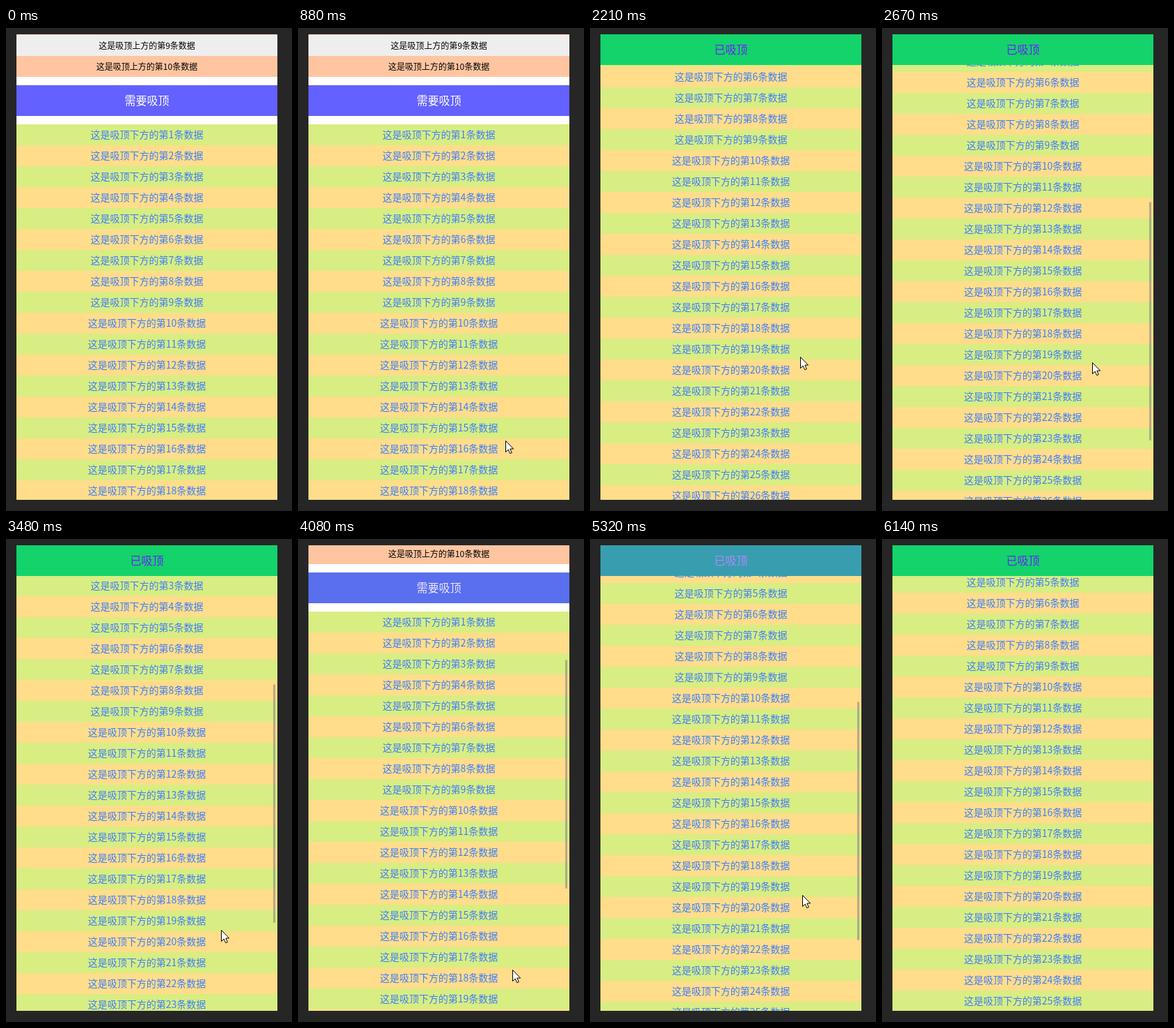
Recreate the animation shown at these times as an HTML page with a canvas. Size 411 px wide and 692 px high, loop 6460 ms.

```html
<!DOCTYPE html>
<html lang="zh-CN">
<head>
<meta charset="utf-8">
<title>吸顶</title>
<style>
html, body { margin: 0; width: 100%; height: 100%; overflow: hidden; background: #262626; }
canvas { display: block; }
</style>
</head>
<body>
<canvas id="stage" width="411" height="692"></canvas>
<script>
const ctx = document.getElementById('stage').getContext('2d');
const LOOP = 6460, LEFT = 15, TOP = 9, WIDTH = 375, HEIGHT = 667, ROW = 30, BAR = 44, GAP = 12;
const ABOVE = 360;            // height of everything before the bar
const STICK = ABOVE + GAP;    // offset at which the bar reaches the top
const FADE = 500;             // colour transition of the bar

// [time, scroll offset]
const SCROLL = [[1050, 299], [1410, 376], [1710, 476], [2310, 476], [2670, 468], [2980, 465],
  [3480, 389], [3700, 383], [4300, 305], [4740, 292], [4820, 292], [5165, STICK], [5320, 438], [5540, 454]];
// [time, x, y + scroll offset]: the last stays level while the pointer drags the page
const POINTER = [[210, 330, 953], [350, 301, 881], [510, 299, 880], [880, 298, 890], [1410, 306, 885],
  [2210, 302, 947], [2670, 302, 947], [3480, 309, 949], [4580, 307, 951], [5320, 305, 948],
  [5640, 304, 948], [6140, 325, 1148]];

const clamp = v => Math.min(1, Math.max(0, v));
const lerp = (a, b, p) => a + (b - a) * p;
const mix = (a, b, p) => `rgb(${a.map((v, i) => Math.round(lerp(v, b[i], p)))})`;

function track(keys, t, column = 1) {
  const next = keys.findIndex(k => k[0] > t);
  if (next === 0) return keys[0][column];
  if (next < 0) return keys[keys.length - 1][column];
  const a = keys[next - 1], b = keys[next];
  return Math.round(lerp(a[column], b[column], (t - a[0]) / (b[0] - a[0])));
}

// times at which the bar sticks or lets go
const flips = [];
SCROLL.slice(1).forEach(([t1, s1], i) => {
  const [t0, s0] = SCROLL[i];
  if ((s0 < STICK) !== (s1 < STICK)) flips.push(lerp(t0, t1, (STICK - s0) / (s1 - s0)));
});

// cubic-bezier(.25, .1, .25, 1)
function ease(x) {
  const curve = (u, p, q) => 3 * u * (1 - u) ** 2 * p + 3 * u * u * (1 - u) * q + u ** 3;
  let low = 0, high = 1;
  for (let i = 0; i < 20; i++) {
    const mid = (low + high) / 2;
    if (curve(mid, .25, .25) < x) low = mid; else high = mid;
  }
  return curve(low, .1, 1);
}

function strip(y, height, fill, text, size, color) {
  ctx.fillStyle = fill;
  ctx.fillRect(LEFT, y, WIDTH, height);
  ctx.font = `${size}px "Noto Sans CJK SC", "Noto Sans CJK", sans-serif`;
  ctx.fillStyle = color;
  ctx.fillText(text, LEFT + WIDTH / 2, y + height / 2 + Math.ceil(size * .35));
}

function drawRows(count, top, colors, place, size, color) {
  for (let i = 0; i < count; i++)
    strip(top + i * ROW, ROW, colors[i % 2], `这是吸顶${place}方的第${i + 1}条数据`, size, color);
}

function drawScrollbar(t, scroll, stuck) {
  if (t < 1060 || (t > 2210 && t < 2310)) return;
  const content = stuck ? 1302 : 1358;
  const fadeStart = t < 2310 ? 1960 : 5670;
  ctx.globalAlpha = 1 - clamp((t - fadeStart) / 250);
  ctx.fillStyle = 'rgba(128,128,128,.55)';
  ctx.beginPath();
  ctx.roundRect(384, Math.round(TOP + scroll * HEIGHT / content), 3,
    Math.round(HEIGHT * HEIGHT / content), 1.5);
  ctx.fill();
  ctx.globalAlpha = 1;
}

const arrow = new Path2D('M.5 .5V16.5L4.2 13L6.7 18.6L9.3 17.5L6.8 12H11.6Z');
function drawPointer(t, scroll) {
  if (t < POINTER[0][0]) return;
  ctx.save();
  ctx.translate(track(POINTER, t), track(POINTER, t, 2) - scroll);
  ctx.fillStyle = '#fff';
  ctx.strokeStyle = '#000';
  ctx.fill(arrow);
  ctx.stroke(arrow);
  ctx.restore();
}

function draw(t) {
  const scroll = track(SCROLL, t);
  const past = flips.filter(f => t >= f);
  const stuck = past.length % 2 === 1;
  const progress = past.length ? ease(clamp((t - past[past.length - 1]) / FADE)) : 1;
  const tint = stuck ? progress : 1 - progress;
  const flow = TOP + ABOVE - scroll;
  const list = flow + GAP + (stuck ? 0 : BAR + GAP);

  ctx.fillStyle = '#262626';
  ctx.fillRect(0, 0, 411, 692);
  ctx.save();
  ctx.beginPath();
  ctx.rect(LEFT, TOP, WIDTH, HEIGHT);
  ctx.clip();
  ctx.fillStyle = '#fff';
  ctx.fillRect(LEFT, TOP, WIDTH, HEIGHT);
  ctx.textAlign = 'center';
  drawRows(10, flow - 10 * ROW, ['#eee', '#ffc5a1'], '上', 12, '#000');
  drawRows(30, list, ['#d8ed82', '#ffdd8a'], '下', 14, '#3c7eff');
  strip(stuck ? TOP : flow + GAP, BAR, mix([99, 97, 255], [19, 211, 106], tint),
    stuck ? '已吸顶' : '需要吸顶', 16, mix([255, 255, 255], [110, 30, 255], tint));
  drawScrollbar(t, scroll, stuck);
  ctx.restore();
  drawPointer(t, scroll);
}

const start = performance.now();
function tick() {
  draw((performance.now() - start) % LOOP);
  requestAnimationFrame(tick);
}
tick();
</script>
</body>
</html>
```
